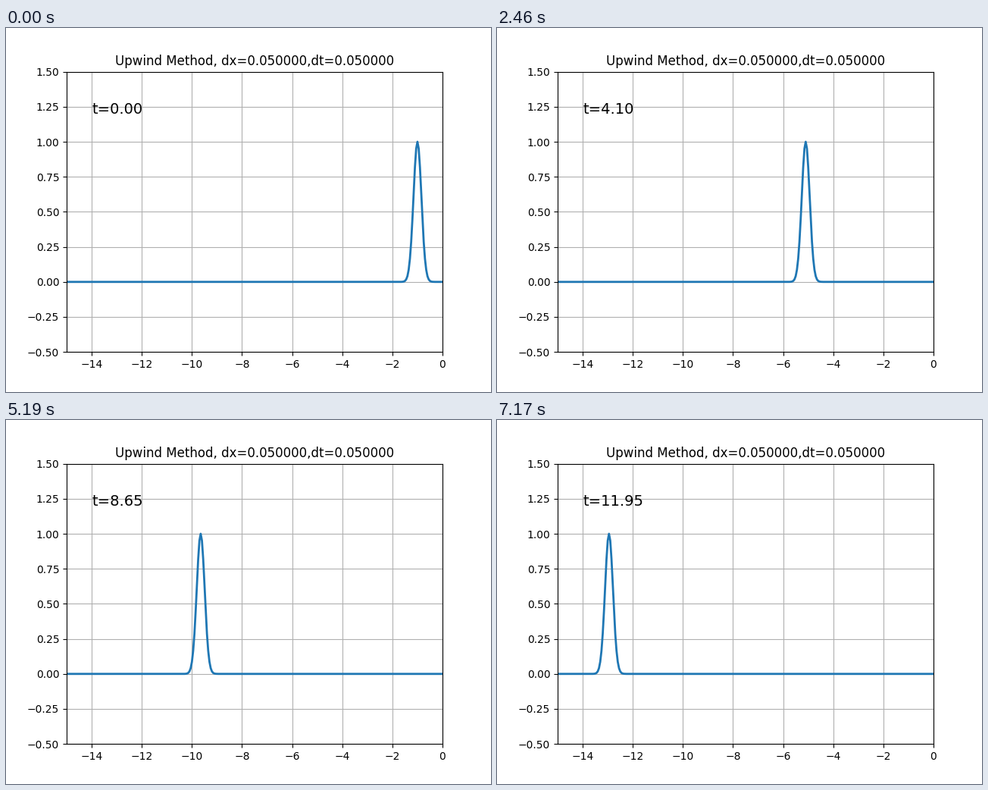
A matplotlib script that plays this animation: 640x480 px, repeating every 7200 ms.

```python
import numpy as np
import matplotlib.pyplot as plt
from matplotlib.animation import FuncAnimation

DX = DT = 0.05
SPEED = -1.0
STEPS = 240

x = np.linspace(-15, 0, 301)


def pulse(x):
    return np.exp(-20 * (x + 1) ** 2)


fig, ax = plt.subplots(figsize=(6.4, 4.8), dpi=100)
ax.set_xlim(-15, 0)
ax.set_ylim(-0.5, 1.5)
ax.set_title(f"Upwind Method, dx={DX:f},dt={DT:f}")
ax.grid(True)
line, = ax.plot(x, pulse(x), lw=2)
clock = ax.text(-14, 1.2, "t=0.00", fontsize=14)


def update(step):
    # At a Courant number of 1 the upwind scheme is an exact shift.
    t = step * DT
    line.set_ydata(pulse(x - SPEED * t))
    clock.set_text(f"t={t:.2f}")
    return line, clock


anim = FuncAnimation(fig, update, frames=STEPS, interval=30,
                     repeat=True, repeat_delay=0)
plt.show()
```
